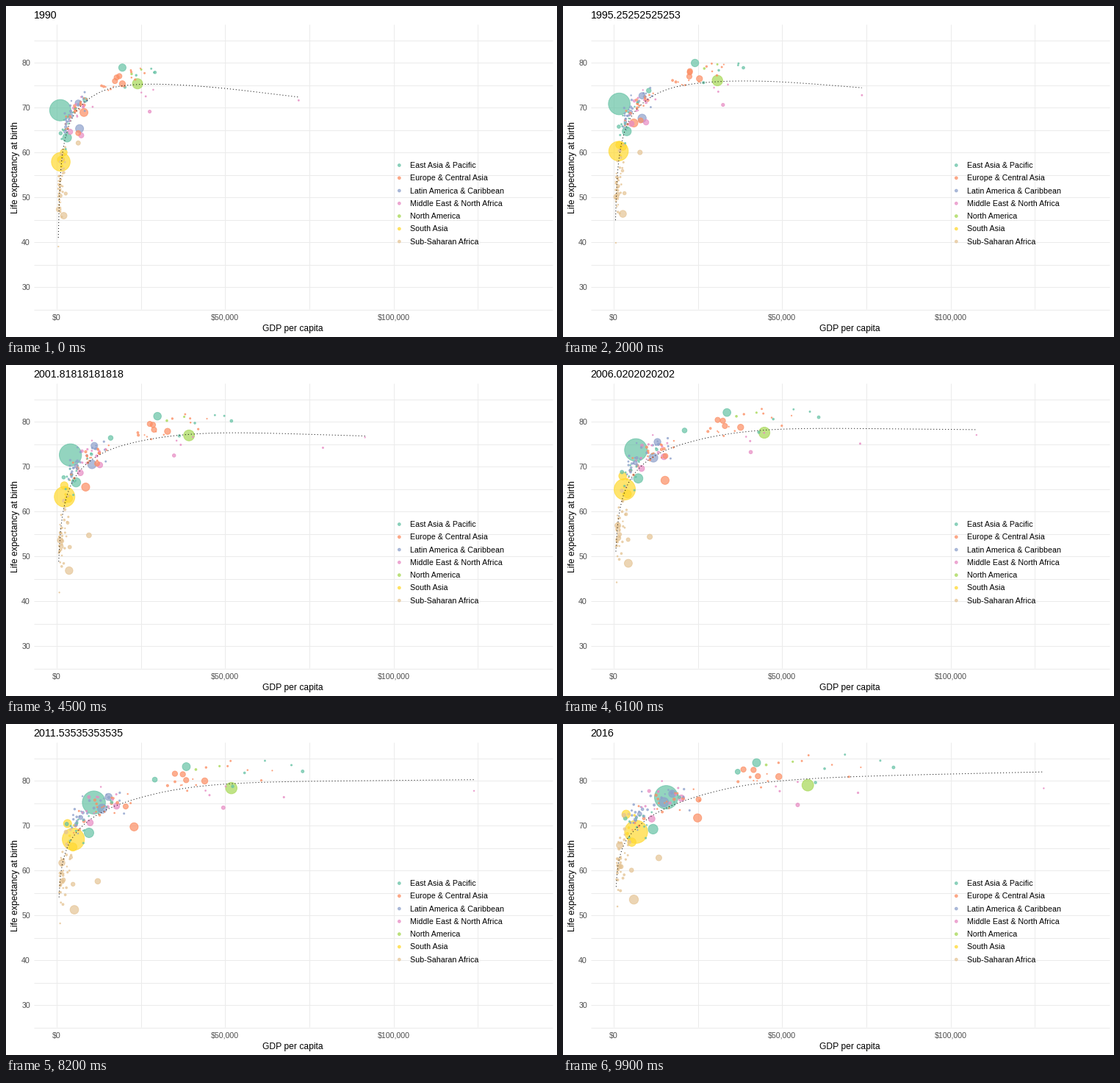
A matplotlib script that plays this animation: 750 by 450 pixels, repeating every 10000 ms.

```python
import numpy as np
import matplotlib.pyplot as plt
from matplotlib.animation import FuncAnimation

W, H, DPI, FRAMES = 750, 450, 100, 100
PT = 72 / DPI                      # points per pixel
S = np.linspace(0, 1, FRAMES)      # progress from 1990 to 2016

EAP, ECA, LAC, MENA, NAM, SAS, SSA = range(7)
REGIONS = ["East Asia & Pacific", "Europe & Central Asia",
           "Latin America & Caribbean", "Middle East & North Africa",
           "North America", "South Asia", "Sub-Saharan Africa"]
COLORS = np.array(["#66C2A5", "#FC8D62", "#8DA0CB", "#E78AC3",
                   "#A6D854", "#FFD92F", "#E5C494"])
POP_GROWTH = [1.22, 1.05, 1.4, 1.65, 1.3, 1.53, 2]

# Large countries and outliers: region, population (millions), then evenly
# spaced waypoints for GDP per capita (thousands) and life expectancy
LARGE = [
    (EAP, 1135, (.98, 15.5), (69.4, 72.9, 76.3)),
    (EAP, 123, (19.4, 42.3), (78.9, 84)),
    (EAP, 181, (3, 11.6), (63.3, 66.8, 69.2)),
    (EAP, 43, (8.4, 36.7), (71.7, 82)),
    (ECA, 148, (8, 5.4, 9.2, 22, 24.8), (68.9, 66, 65.3, 68.8, 71.7)),
    (ECA, 80, (19.4, 48.9), (75.3, 80.9)),
    (ECA, 58, (17.7, 41.4), (76.7, 82.4)),
    (ECA, 57, (18.5, 38.4), (77, 82.5)),
    (ECA, 57, (17.2, 42.7), (75.9, 81)),
    (ECA, 54, (6.3, 25.1), (64.3, 71.3, 75.8)),
    (LAC, 149, (6.7, 14.8), (65.3, 71, 75.2)),
    (LAC, 85, (6.3, 17.3), (71, 75, 77.1)),
    (MENA, 56, (7.2, 20), (63.8, 71, 76.1)),
    (MENA, 57, (3.9, 11.2), (64.6, 69, 71.5)),
    (MENA, 16, (27.5, 33.5, 35, 47, 54.5), (69.1, 72.8, 74.6)),
    (MENA, 2, (71.7, 74, 80, 65, 72.4), (71.6, 77.3)),
    (NAM, 250, (23.9, 57.5), (75.3, 77.1, 79)),
    (SAS, 870, (1.13, 6.57), (57.9, 63.8, 68.6)),
    (SAS, 107, (2, 5.3), (60, 66.3)),
    (SAS, 106, (1.2, 3.6), (58.4, 66.5, 72.5)),
    (SSA, 95, (2, 5.9), (45.9, 46.9, 53.5)),
    (SSA, 48, (.5, 1.7), (47.3, 54.2, 65.6)),
    (SSA, 37, (6.3, 13.3), (62.1, 59.5, 53.6, 55.2, 62.8)),
]
# The richest dot only joins after a third of the time
LATE = (MENA, .5, (60, 75, 95, 122, 127.5), (75, 78.3))

# Seeded rest: region, count, GDP range, growth, life offset, spread, gain
SMALL = [
    (EAP, 14, (.9, 7), 3, 0, 2.2, 6),
    (EAP, 5, (17, 30), 2.7, 1, 1, 6.5),
    (ECA, 20, (2.5, 9), 2.6, .2, 1, 5),
    (ECA, 13, (13, 29), 2.5, .8, .8, 5.8),
    (LAC, 26, (2, 9), 2.2, .3, 1.8, 5),
    (MENA, 10, (2.5, 12), 1.9, -.5, 1.5, 6.5),
    (MENA, 3, (20, 30), 1.9, -4, 1, 5),
    (NAM, 2, (20, 27), 2.1, 2, .5, 5),
    (SAS, 3, (.9, 2.5), 3.4, -3, 2, 12),
    (SSA, 40, (.4, 2.6), 2, -9, 4, 10),
]

# Trend line key points: GDP knots, life in 1990, 2003 and 2016
KNOTS = np.log([.4, 1.1, 2.4, 7.8, 20, 45, 130])
TREND = [(41, 55.7, 63, 70.9, 74.9, 74.6, 68.4),
         (47, 55.9, 61.9, 69.8, 74.8, 77.7, 77),
         (52, 60.6, 64.7, 70.2, 75.3, 79.6, 82)]


def px(gdp):
    return 69.4 + 4.588 * gdp


def py(life):
    return 77.05 + (80 - life) * 6.1


def path(points):
    return np.interp(S, np.linspace(0, 1, len(points)), points)


def grow(points):
    """Fast growers accelerate; the others rise steadily."""
    if len(points) > 2:
        return path(points)
    a, b = points
    return a + (b - a) * S ** np.clip(b / a / 2.6, 1, 2)


def build():
    rng = np.random.default_rng(7)
    rows = [(r, pop, grow(gdp), path(life)) for r, pop, gdp, life in LARGE]
    r, pop, gdp, life = LATE
    rows.append((r, pop, np.where(S < .38, np.nan, path(gdp)), path(life)))
    for r, n, span, growth, offset, spread, gain in SMALL:
        sag = 3 * np.sin(np.pi * S) * (r == SSA)
        for _ in range(n):
            start = np.exp(rng.uniform(*np.log(span)))
            life = 62 + 4.5 * np.log(start) + offset + rng.normal(0, spread)
            end = start * growth * rng.uniform(.8, 1.25)
            rise = gain * rng.uniform(.7, 1.3)
            rows.append((r, rng.lognormal(.8, 1.1), grow((start, end)),
                         life + rise * S - sag))
    rows.sort(key=lambda row: -row[1])
    region, pop, gdp, life = map(np.array, zip(*rows))
    rate = np.array(POP_GROWTH)[region, None]
    return region, pop[:, None] * rate ** S, gdp, life


def hermite(x, xk, yk):
    m = np.gradient(yk, xk)
    i = np.clip(np.searchsorted(xk, x) - 1, 0, len(xk) - 2)
    h = xk[i + 1] - xk[i]
    t = (x - xk[i]) / h
    return ((1 + 2 * t) * (1 - t) ** 2 * yk[i] + t * (1 - t) ** 2 * h * m[i]
            + t * t * (3 - 2 * t) * yk[i + 1] + t * t * (t - 1) * h * m[i + 1])


def area(pop):
    return (2 * PT * (.35 + .42 * np.sqrt(pop))) ** 2


region, pop, gdp, life = build()
levels = np.array([path(knot) for knot in zip(*TREND)])

plt.rcParams["font.family"] = "Liberation Sans"
fig = plt.figure(figsize=(W / DPI, H / DPI), dpi=DPI, facecolor="white")
ax = fig.add_axes([0, 0, 1, 1])
ax.set(xlim=(0, W), ylim=(H, 0))
ax.axis("off")


def label(x, y, text, size, color="black", ha="left", **kw):
    return ax.text(x, y, text, fontsize=size * PT, color=color, ha=ha,
                   va="baseline", **kw)


# Lines snap upwards to the next pixel centre, hence the half pixel
GRID = dict(color="#EBEBEB", lw=PT, zorder=1)
ax.hlines([py(v) for v in range(25, 90, 5)], 38, 744, **GRID)
ax.vlines([px(v) - .5 for v in range(0, 150, 25)], 25, 412, **GRID)
for v in range(30, 90, 10):
    label(33, py(v) + 4, str(v), 10.6, "#4D4D4D", "right")
for v in (0, 50, 100):
    label(px(v) - .5, 427, f"${v * 1000:,}", 10.6, "#4D4D4D", "center")
label(390.5, 442, "GDP per capita", 12.1, ha="center")
label(16, 219.5, "Life expectancy at birth", 12.1, ha="center",
      rotation=90, rotation_mode="anchor")
title = label(37.5, 17, "", 14.3)

legend_y = 216.5 + 17.28 * np.arange(7)
ax.scatter([535.3] * 7, legend_y, s=(3.7 * PT) ** 2, c=COLORS, alpha=.7, lw=PT)
for y, name in zip(legend_y, REGIONS):
    label(550, y + 3.5, name, 10.65)

dots = ax.scatter(px(gdp[:, 0]), py(life[:, 0]), s=area(pop[:, 0]),
                  c=COLORS[region], alpha=.7, lw=PT, zorder=2,
                  plotnonfinite=True)
trend, = ax.plot([], [], color="black", lw=PT, ls=(0, (1, 3)),
                 dash_capstyle="butt", zorder=3)


def update(i):
    title.set_text(f"{1990 + 26 * S[i]:.15g}")
    dots.set_offsets(np.c_[px(gdp[:, i]), py(life[:, i])])
    dots.set_sizes(area(pop[:, i]))
    x = np.geomspace(.4 + .25 * S[i], np.nanmax(gdp[:, i]), 160)
    trend.set_data(px(x), py(hermite(np.log(x), KNOTS, levels[:, i])))
    return title, dots, trend


anim = FuncAnimation(fig, update, frames=FRAMES, interval=100, repeat=True)
plt.show()
```
